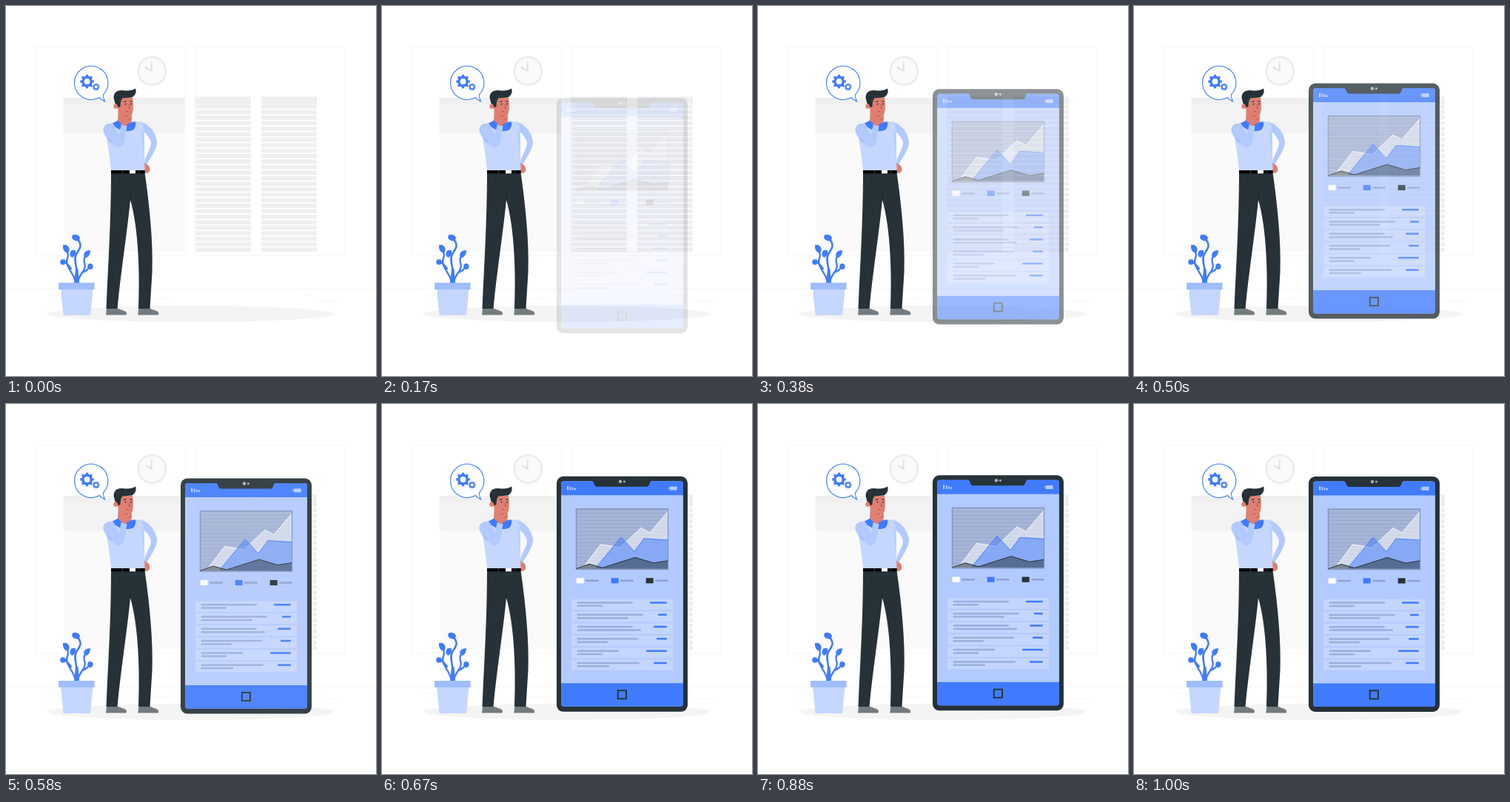
Recreate the animation shown at these times as an HTML page. Size 500 by 500 pixels, loop 1.04 s.

```html
<!DOCTYPE html>
<html lang="en">
<head>
<meta charset="utf-8">
<title>Thinking man and phone</title>
<style>
html, body { margin: 0; width: 100%; height: 100%; overflow: hidden; background: #fff; }
svg { display: block; width: 100vw; height: 100vh; }
.blue { fill: #407bff; }
.dark { fill: #263238; }
.skin { fill: #e07f72; }
.shirt { fill: #c5d7ff; }
.sleeve { fill: #b3caff; }
.line { fill: none; stroke-linecap: round; stroke-linejoin: round; }
</style>
</head>
<body>
<svg viewBox="0 0 500 500">
  <!-- room -->
  <g fill="none" stroke="#f6f6f6">
    <rect x="39.5" y="55.5" width="203" height="281.5" rx="2"/>
    <rect x="255.5" y="55.5" width="202.500" height="281.5" rx="2"/>
    <path d="M0 382.500H500M416 398.500H449M400 390H416M170 395.500H225M53 391H72"/>
  </g>
  <rect x="79" y="124" width="161" height="207" fill="#fafafa"/>
  <rect x="77.500" y="124" width="164" height="48" fill="#f7f7f7"/>
  <rect x="77.500" y="124" width="164" height="9.500" fill="#f0f0f0"/>
  <g id="blinds"></g>
  <circle cx="197.300" cy="88" r="18.700" fill="#fafafa" stroke="#ededed" stroke-width="3"/>
  <path class="line" d="M196.700 76V87.500L189 83.500" stroke="#e2e2e2" stroke-width="2"/>
  <ellipse cx="249.500" cy="416" rx="194" ry="11" fill="#f4f4f4"/>

  <!-- plant -->
  <g class="line" stroke="#407bff" stroke-width="2.300">
    <path d="M95.500 375C98 352 90 344 95 335C100 328 104 322 96 315" stroke-width="2.600"/>
    <path d="M94 375C94 362 78 352 83 341Q85 336 82 330M88 355Q84 348 78 346"/>
    <path d="M97 375C97 362 110 358 106 347Q104 341 109 335M104 360Q110 357 113 353"/>
  </g>
  <g class="blue">
    <path d="M92 375L94 355H97.500L99 375Z"/>
    <ellipse cx="94.500" cy="313" rx="5.600" ry="4.200" transform="rotate(20 94 313)"/>
    <path d="M77 323Q84 322 85.500 328Q86 333 82.500 334Q76 331 77 323Z"/>
    <path d="M94 330.500Q88 328 86.500 334Q86 338 89.500 340Q95 337 94 330.500Z"/>
    <path d="M114 330Q106 330 105 336Q106 340 109 340Q114 337 114 330Z"/>
    <ellipse cx="77" cy="346" rx="3.800" ry="3.800"/>
    <ellipse cx="113.800" cy="352" rx="3.700" ry="4"/>
  </g>
  <path class="shirt" d="M74 382H117.500L114 418H77.500Z"/>
  <rect x="71" y="374" width="48.500" height="9" fill="#9fbdff"/>

  <!-- thought bubble -->
  <path d="M126.500 123.600A22.700 22.700 0 1 1 131.500 119.700Q131 124 133.500 129Q129 127 126.500 123.600Z" fill="#fff" stroke="#407bff" stroke-width="1.100"/>
  <g fill="none" stroke="#407bff">
    <circle cx="109.500" cy="102" r="5.700" stroke-width="3.600"/>
    <circle cx="109.500" cy="102" r="8" stroke-width="2.600" pathLength="16" stroke-dasharray="1" stroke-dashoffset=".5"/>
    <circle cx="121.700" cy="109.300" r="3" stroke-width="1.800"/>
    <circle cx="121.700" cy="109.300" r="4.200" stroke-width="1.500" pathLength="16" stroke-dasharray="1" stroke-dashoffset=".5"/>
  </g>

  <!-- man -->
  <path class="skin" d="M187 211Q194 215 194.500 221Q194 225.500 189 226L186 223Z"/>
  <path class="sleeve" d="M181 156.500C195 159 204 174 204 184.500C203.500 194 195 206 189.500 215L187 209C191 199 196 191 196 185C195 178 189 172 184 169Z"/>
  <g fill="#737b7f">
    <path id="shoe" d="M136 408.500H150.500L161 412.500Q164 414.500 162.500 417.500H135Z"/>
    <use href="#shoe" x="43.300"/>
  </g>
  <path class="dark" d="M142 225H187.500C194 270 199 320 197.500 360L194.500 409H179C181 360 179 300 168 262C163 312 155 360 150.500 409H135.500C138 350 142 290 142 225Z"/>
  <path class="line" d="M167.500 263Q169 255 168 249" stroke="#172025" stroke-width=".8"/>
  <path class="shirt" d="M144 158L152 156H168L183 156.500Q187 164 186.500 180L187.500 222.500H142L139 196Q135 176 136 166Z"/>
  <path class="sleeve" d="M183 165Q185 190 187 205L186.500 174Z"/>
  <rect x="142" y="222" width="45.700" height="4.300"/>
  <path d="M157.500 222V226.300M180 222V226.300" stroke="#33414a"/>
  <rect x="167" y="222" width="8" height="4.300" fill="#fff"/>
  <path class="skin" d="M152 134H163V157Q157 163 151 156Z"/>
  <path class="blue" d="M142 159.500L151.500 154.500Q156 162 169 157L175 156.500Q176 163 172 167.500Q160 171.500 150 165Z"/>
  <path class="skin" d="M152 124H171Q173 138 170.500 146Q168 151 161 150Q153 148 151 138Z"/>
  <circle class="skin" cx="148.500" cy="135.500" r="3.200"/>
  <path class="dark" d="M146 126C144 119 149 113 157 114C164 115 171 114 175 111.500C177 117 174 121 170.500 123.500L157.500 124.500Q154.500 128 154.500 136L151.500 137Q150.500 132 147.500 132Z"/>
  <g class="dark"><circle cx="161.500" cy="132.500" r="1"/><circle cx="168.800" cy="132.500" r="1"/></g>
  <path class="line" d="M159 129.500L162.500 128.500M167.500 128.500L170.500 129.500" stroke="#263238"/>
  <path class="line" d="M166 134L167.500 138L165.500 138.500M161.500 142Q163 141 165 143" stroke="#a84a43" stroke-width=".8"/>
  <path class="sleeve" d="M145 159C134 157 130 164 132 171C136 180 143 187 150 190.500C156 192.500 159 188 160 183L163.500 162L156 159L152.500 175Z"/>
  <path d="M137 177L143.500 185L139 182Z" fill="#8faeee"/>
  <path class="skin" d="M157 161L155.500 151Q159 147 165 146L169.500 147Q171 152 169 157L163 160V162Z"/>
  <path class="line" d="M158 150Q162 148 165 148M165 153L169 152" stroke="#b6574f" stroke-width=".7"/>

  <!-- phone -->
  <g id="phone" opacity="0">
    <rect class="dark" x="236" y="98" width="177" height="318" rx="9"/>
    <rect x="242" y="104.500" width="165" height="304.500" rx="4" fill="#b3caff"/>
    <path class="blue" d="M242 123.500V108.500Q242 104.500 246 104.500H403Q407 104.500 407 108.500V123.500Z"/>
    <path class="blue" d="M242 377.500H407V405Q407 409 403 409H246Q242 409 242 405Z"/>
    <path class="dark" d="M284 104H364Q362 105 361 109Q360 112 357.500 112H290.500Q288 112 287 109Q286 105 284 104Z"/>
    <g fill="#a8adaf"><circle cx="322" cy="105" r="2.300"/><circle cx="327.400" cy="105" r="1.500"/></g>
    <path d="M251 111V116.500M254.500 112V116.500M257.800 113V116.500M261 114V116.500" stroke="#b3caff" stroke-width="2"/>
    <path d="M389 111.700H398.700V116.700H389ZM387 113H388.200V115.400H387Z" fill="#b3caff"/>
    <rect x="262.500" y="142" width="124" height="81.500" fill="#a6b5d7" stroke="#8396c0" stroke-width="1.500"/>
    <g id="grid"></g>
    <path d="M263 223L275 217L295.500 190L322 194L350 167.500L362 174L386 146V222.500Z" fill="#fff" fill-opacity=".5"/>
    <path class="line" d="M275 217L295.500 190L322 194L350 167.500L362 174L386 146" stroke="#fff" stroke-width=".9"/>
    <path d="M288 222.500L323 180L341 199.500L354 182L386 184V222.500Z" fill="#407bff" fill-opacity=".5"/>
    <path class="line" d="M291 219L323 180L341 199.500L354 182L386 184" stroke="#407bff" stroke-width=".9"/>
    <path class="dark" d="M263 222.500L280 216.500L298 221.500L342 207.500L367 215L386 212V222.800H263Z" fill-opacity=".5"/>
    <path class="line" d="M263 222.500L280 216.500L298 221.500L342 207.500L367 215L386 212" stroke="#263238"/>
    <g id="list"></g>
    <rect x="318.800" y="387.300" width="11.200" height="11.200" fill="none" stroke="#263238" stroke-width="1.900"/>
  </g>
</svg>
<script>
const byId = id => document.getElementById(id);
const box = (x, y, w, h, fill, rx = 0) =>
  `<rect x="${x}" y="${y}" width="${w}" height="${h}" rx="${rx}" fill="${fill}"/>`;
const bar = (x1, x2, y, fill) => box(x1, y - 1.25, x2 - x1, 2.5, fill, 1.2);
const repeat = (n, make) => Array.from({ length: n }, (_, i) => make(i)).join("");

byId("blinds").innerHTML =
  repeat(17, i => box(77.5, 134.5 + i * 2.25, 164, .8, "#ededed")) +
  [256, 345].map(x =>
    box(x, 122.5, 75, 16, "#efefef", 1) +
    box(x, 132.8, 75, .8, "#f9f9f9") +
    repeat(26, i => box(x, 140.6 + i * 7.44, 75, 5.6, "#efefef", 1.5))).join("");

byId("grid").innerHTML = repeat(15, i => box(263, 147 + i * 5, 123, .8, "#94a5cb"));

// Each row: ends of the two text lines, start of the value on the right
const rows = [[339, 298, 362], [353, 333, 373], [339, 350, 367],
  [346, 305, 371], [320, 298, 357], [348, 307, 367]];
byId("list").innerHTML =
  ["#fff", "#407bff", "#263238"].map((fill, i) =>
    box(262.7 + i * 47, 235.3, 10, 7.2, fill) +
    bar(275 + i * 47, 293 + i * 47, 239, "#8fa3d0")).join("") +
  rows.map(([a, b, c], i) => {
    const y = 268.6 + i * 16.3;
    return box(256, y - 4.6, 137, 14.4, "#c4d5ff") + bar(263.5, a, y, "#9bafdc") +
      bar(263.5, b, y + 4.4, "#9bafdc") + bar(c, 385, y, "#407bff");
  }).join("");

const bezier = (s, a, b) => 3 * (1 - s) ** 2 * s * a + 3 * (1 - s) * s * s * b + s ** 3;

// cubic-bezier(.36, -.01, .5, 1.38), overshooting slightly before it settles
function ease(x) {
  if (x >= 1) return 1;
  let lo = 0, hi = 1;
  for (let i = 0; i < 24; i++) {
    const mid = (lo + hi) / 2;
    if (bezier(mid, .36, .5) < x) lo = mid; else hi = mid;
  }
  return bezier(lo, -.01, 1.38);
}

const phone = byId("phone");
const LOOP = 1040, FPS = 24;

function draw(now) {
  const step = Math.floor((now % LOOP + 4) * FPS / 1000);
  const p = step < 3 ? 0 : ease(step / FPS + .02);
  phone.setAttribute("opacity", Math.min(1, p));
  phone.setAttribute("transform", `translate(0 ${30 * (1 - p)})`);
}

let start;
function tick(now) {
  start ??= now;
  draw(now - start);
  requestAnimationFrame(tick);
}
requestAnimationFrame(tick);
</script>
</body>
</html>
```
